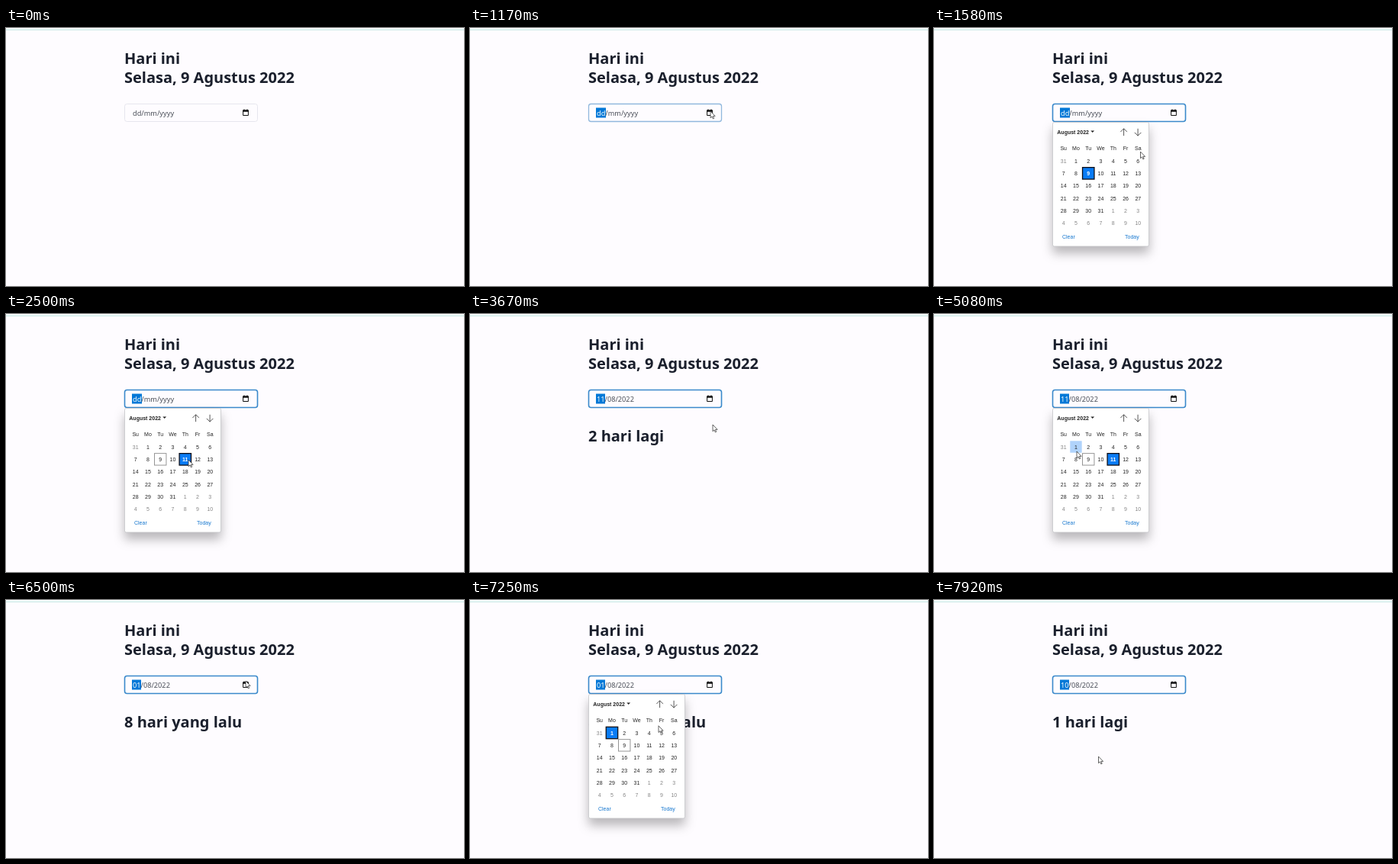
Animation, 600 px wide and 338 px high, one loop 8 s. Source, as an HTML page:

```html
<!DOCTYPE html>
<html lang="id">
<head>
<meta charset="utf-8">
<title>Hitung hari</title>
<style>
  html, body { margin: 0; width: 100%; height: 100%; overflow: hidden; background: #fefcff; }
  svg { display: block; width: 100%; height: 100%; }
  .title { font: 700 20px "Noto Sans", "Open Sans", sans-serif; fill: #1a1f2c; }
  .field { font: 9.2px "Noto Sans", "Open Sans", sans-serif; fill: #4a4f58; }
  #picker { font: 7px "Liberation Sans", Arial, sans-serif; fill: #222; }
  .day { text-anchor: middle; }
  .other { fill: #858585; }
  .picked { fill: #fff; font-weight: 700; }
  .link { fill: #1677cf; }
  .panel { filter: drop-shadow(0 9px 7px rgba(0, 0, 0, .27)); }
</style>
</head>
<body>
<svg viewBox="0 0 600 338" xmlns="http://www.w3.org/2000/svg">
  <rect width="600" height="338" fill="#fefcff"/>
  <rect width="600" height="2" fill="#f6fdfd"/>
  <rect y="2" width="600" height="1" fill="#c6e7e4"/>

  <text class="title" x="155" y="47">Hari ini</text>
  <text class="title" x="155" y="72.4">Selasa, 9 Agustus 2022</text>
  <text class="title" id="result" x="155" y="167"></text>

  <rect id="box" x="155.5" y="99.5" width="174" height="23" rx="3" fill="#fefcff"/>
  <rect id="mark" x="165" y="104.5" height="13" fill="#0078d7"/>
  <text class="field" x="166" y="115"><tspan id="dayPart"></tspan><tspan id="restPart"></tspan></text>
  <path d="M310.6 108h6.8v6.5h-6.8z" fill="none" stroke="#111"/>
  <path d="M310.1 107.5h7.8v2.3h-7.8zM311.4 106.5h1.2v1h-1.2zM315.4 106.5h1.2v1h-1.2z" fill="#111"/>

  <g id="picker">
    <rect class="panel" x="155.5" y="123.5" width="126" height="162.5" rx="2" fill="#fff" stroke="#c4c4c8" stroke-width=".8"/>
    <text x="161.3" y="138.6" font-weight="700">August 2022</text>
    <path d="M205.3 134.4h4.8l-2.4 2.7z"/>
    <path d="M248.6 141.2v-9.4M244.3 136.1l4.3-4.3 4.3 4.3M267.1 131.8v9.4M262.8 136.9l4.3 4.3 4.3-4.3" fill="none" stroke="#444" stroke-width=".9"/>
    <g id="days"></g>
    <text class="link" x="168" y="276.3">Clear</text>
    <text class="link" x="250" y="276.3">Today</text>
  </g>

  <path id="cursor" d="M0 0V8.7L2 6.9 3.3 9.9 4.7 9.3 3.4 6.4H6.1Z" fill="#fff" stroke="#222" stroke-width=".7"/>
</svg>
<script>
const NS = "http://www.w3.org/2000/svg";
const $ = id => document.getElementById(id);
const LOOP = 8000, FPS = 12, TODAY = 9;
const CELL_W = 16.27, CELL_H = 16.35, LEFT = 169.7, TOP = 174;

// Cursor stops: step, x, y
const path = [
  [3, 372, 177], [12, 315, 109], [16, 315, 109], [22, 226, 215], [24, 232, 227],
  [26, 239, 191], [31, 239, 191], [36, 329, 250], [41, 329, 250], [44, 318, 145],
  [47, 312, 113], [49, 312, 113], [50, 310, 113], [53, 310, 113], [61, 187, 180],
  [62, 187, 180], [63, 188, 177], [66, 188, 177], [74, 290, 156], [78, 314, 106],
  [82, 314, 106], [90, 216, 192], [91, 216, 194], [94, 216, 194], [95, 215.5, 205]
];

// Each visit to the picker, in steps, and the day chosen
const visits = [
  { open: 15, pick: 30, close: 32, day: 11 },
  { open: 52, pick: 65, close: 66, day: 1 },
  { open: 81, pick: 94, close: 95, day: 10 }
];

function add(tag, attrs, text = "") {
  const el = document.createElementNS(NS, tag);
  for (const key in attrs) el.setAttribute(key, attrs[key]);
  el.textContent = text;
  return $("days").appendChild(el);
}

["Su", "Mo", "Tu", "We", "Th", "Fr", "Sa"].forEach((name, col) =>
  add("text", { class: "day", x: LEFT + col * CELL_W, y: 159.8 }, name));

const cells = Array.from({ length: 42 }, (_, i) => {
  const x = LEFT + (i % 7) * CELL_W;
  const y = TOP + Math.floor(i / 7) * CELL_H;
  const inMonth = i > 0 && i < 32;
  const frame = add("rect", { x: x - 7.7, y: y - 7.7, width: 15.4, height: 15.4, fill: "none" });
  const label = add("text", { x, y: y + 2.5 }, i === 0 ? 31 : inMonth ? i : i - 31);
  return { x, y, day: inMonth ? i : 0, frame, label };
});

function cursorAt(step) {
  let i = 0;
  while (i < path.length - 2 && step > path[i + 1][0]) i++;
  const [s0, x0, y0] = path[i], [s1, x1, y1] = path[i + 1];
  const p = Math.min(1, Math.max(0, (step - s0) / (s1 - s0)));
  const e = p * p * (3 - 2 * p);
  return [x0 + (x1 - x0) * e, y0 + (y1 - y0) * e];
}

function mix(a, b, p) {
  return `rgb(${a.map((v, i) => Math.round(v + (b[i] - v) * p))})`;
}

function resultText(day) {
  if (!day) return "";
  const diff = day - TODAY;
  return diff > 0 ? `${diff} hari lagi` : `${-diff} hari yang lalu`;
}

function drawField(step, value) {
  const focused = step >= 13;
  const glow = Math.min(1, Math.max(0, (step - 12.9) * 0.45));
  $("box").setAttribute("stroke", mix([230, 230, 238], [58, 137, 203], glow));
  $("box").setAttribute("stroke-width", 1 + glow * 0.6);
  $("mark").setAttribute("width", focused ? (value ? 12 : 13) : 0);
  $("dayPart").textContent = value ? String(value).padStart(2, "0") : "dd";
  $("dayPart").setAttribute("fill", focused ? "#fff" : "#4a4f58");
  $("restPart").textContent = value ? "/08/2022" : "/mm/yyyy";
}

function drawDays(selected, x, y) {
  for (const c of cells) {
    const isPicked = c.day > 0 && c.day === selected;
    const isHover = Math.abs(x - c.x) < CELL_W / 2 && Math.abs(y - c.y) < CELL_H / 2;
    const isToday = c.day === TODAY;
    c.frame.setAttribute("fill", isPicked ? "#0a7cf5" : isHover ? "#b0d3fb" : "none");
    c.frame.setAttribute("stroke", isPicked ? "#101018" : isToday ? "#8a8a8a" : "none");
    c.frame.setAttribute("stroke-width", isPicked ? 1.3 : 0.9);
    c.label.setAttribute("class", "day" + (isPicked ? " picked" : c.day ? "" : " other"));
  }
}

function draw(ms) {
  const step = Math.floor((ms % LOOP + 4) * FPS / 1000);
  const [x, y] = cursorAt(step);
  const visit = visits.find(v => step >= v.open && step < v.close);
  const value = visits.reduce((day, v) => step >= v.close ? v.day : day, 0);

  drawField(step, value);
  $("result").textContent = resultText(value);
  $("picker").style.display = visit ? "" : "none";
  if (visit) drawDays(step >= visit.pick ? visit.day : value || TODAY, x, y);
  $("cursor").style.display = step >= 3 ? "" : "none";
  $("cursor").setAttribute("transform", `translate(${x} ${y})`);
}

const start = performance.now();
function tick() {
  draw(performance.now() - start);
  requestAnimationFrame(tick);
}
tick();
</script>
</body>
</html>
```
